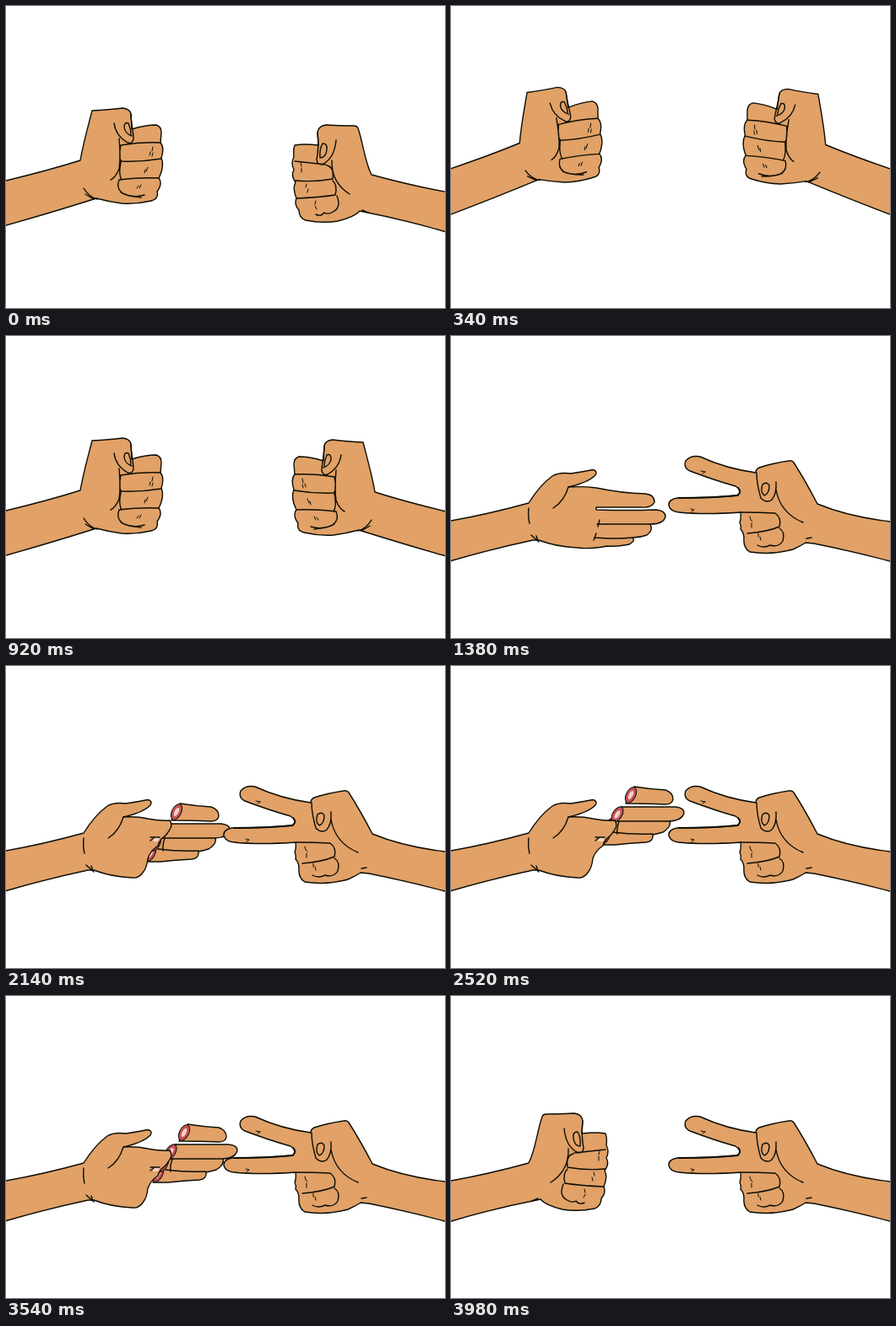
Recreate the animation shown at these times as an HTML page. Size 520 by 358 pixels, loop 4020 ms.

```html
<!DOCTYPE html>
<html lang="en">
<head>
<meta charset="utf-8">
<title>Rock paper scissors</title>
<style>
  html, body { margin: 0; width: 100%; height: 100%; overflow: hidden; background: #fff; }
  svg { display: block; width: 520px; height: 358px; }
  path, ellipse { stroke: #0c0d04; stroke-width: 1.4; stroke-linecap: round; stroke-linejoin: round; fill: none; }
  .skin { fill: #e1a167; }
  .fine { stroke-width: 1; }
  .bold { stroke-width: 2; }
  .flesh { fill: #c9505a; stroke-width: 1; }
  .bone { fill: #f3d3c4; stroke: none; }
</style>
</head>
<body>
<svg viewBox="0 0 520 358">
  <defs>
    <g id="up">
      <path class="skin" d="M-40 207L0 188.5L80 150.5Q76 120 78 93Q78 90 82 88Q98 80 117 76Q120 75 121 78Q126 86 131 98Q143 89 152 84Q155 82 159 85Q166 92 168 102Q173 108 171 117Q178 124 173 136Q177 147 169 154Q174 165 173 176Q171 184 160 186Q135 189 108 185.5L0 237L-40 256"/>
      <path d="M111 103Q114 115 126 116Q138 114 137 109Q135 104 131 98M117 95Q118 91 124 94Q128 98 128 104M117 95Q119 103 126 105M124 117Q128 145 120 159M126 118Q145 115 167 106M126 118Q123 128 129 133Q150 128 173 128M129 133Q124 145 129 150Q150 148 169 152M127 151Q126 165 133 167Q142 168 147 170M138 170Q150 168 157 169M146 170Q147 176 151 178M105 184L113 187"/>
      <path class="fine" d="M156 90l-1 3l3 3l-1 4l2 3M157 111l-1 4l2 3M154 134l-1 3l2 3M152 154l1 3l0 4"/>
    </g>

    <g id="down">
      <path class="skin" d="M-40 217L0 207Q50 195 88 183C92 160 98 140 102 124Q122 123 138 121Q147 122 148 128L149 146Q165 141 178 141Q184 143 184 150L183 162Q188 168 184 180Q188 190 181 204Q186 210 179 220Q181 229 172 231Q155 235 137 234Q122 232 107 228Q50 246 0 260L-40 271"/>
      <path d="M148 128C148 138 151 150 151 158Q149 164 144 162Q130 154 128 139M140 144Q140 137 145 139Q148 146 148 152M140 144Q141 151 149 154M134 157Q136 180 134 193Q130 203 124 206M136 165Q160 161 183 162M136 165Q133 182 137 184Q160 185 184 181M136 185Q133 200 137 206M134 206Q160 203 181 204M134 206Q130 216 138 222Q150 228 164 224M136 221Q144 226 160 227M92 216Q98 226 108 229M94 223L104 229"/>
      <path class="fine" d="M174 167l-1 5M174 174l-1 4M171 173l-1 4M168 191l-2 5M165 194l-1 4M160 212l-2 4M157 213l-2 3"/>
    </g>

    <g id="mid"><use href="#down" transform="rotate(-5 -150 250)"/></g>

    <g id="low">
      <path class="skin" d="M-40 228L0 219Q45 211 92 198C100 183 102 160 108 143Q109 140 113 140Q130 140 146 139Q155 140 156 148L155 163Q172 161 183 163Q185 168 184 177Q188 184 184 192Q188 199 182 207Q186 214 181 226Q184 233 178 240Q178 249 170 252Q150 256 132 253Q112 248 106 241Q50 252 0 267L-40 277"/>
      <path d="M156 148Q154 165 157 180Q156 188 149 185Q136 178 134 157M145 168Q144 161 150 161Q154 168 153 178Q146 178 145 168M139 181Q140 207 118 221M146 186Q165 184 183 182M145 187Q136 189 138 203Q160 207 182 205M138 205Q132 211 135 222Q155 225 181 226M133 223Q128 236 136 241Q143 246 148 243Q152 248 158 245M96 243L103 240"/>
      <path class="fine" d="M176 184l-1 4M175 190l0 5M169 209l1 4M167 215l1 4M158 229l1 4M159 235l-2 4"/>
    </g>

    <g id="paper">
      <path class="skin" d="M-40 228L0 219Q45 211 92 198Q105 177 120 166Q128 161 142 163Q156 161 168 158.5Q174 160 171 165Q162 174 139 179Q155 178 172 180Q200 186 230 187Q241 188 241 197Q238 204 225 203L172 203L172 206Q210 207 243 206Q254 207 254 214Q252 223 236 223Q240 230 232 236Q224 239 215 239Q219 243 211 247Q195 250 185 249Q165 253 150 251Q125 250 104 242L97 242Q50 252 0 266.5L-40 277"/>
      <path d="M139 179Q134 196 121 204M92 204Q91 214 93 222M173 223H236M170 239Q195 241 215 239M176 218L174 226M172 234L169 242M95 236L104 244M101 237L103 243"/>
    </g>

    <g id="cut">
      <path class="skin" d="M-40 228L0 219Q45 211 92 198Q105 177 120 166Q128 161 142 163Q156 161 168 158.5Q174 160 171 165Q162 174 139 179Q155 178 168 181Q185 184 194 183Q197 187 195 192Q191 200 184 205Q181 209 180 213Q171 219 168 228Q167 239 162 245Q157 252 150 251Q125 250 104 242L97 242Q50 252 0 266.5L-40 277"/>
      <path class="bone" d="M172 203H182L180 208H175Z"/>
      <path d="M139 179Q134 196 121 204M92 204Q91 214 93 222M171 203H182M171 207L175 204M95 236L104 244M101 237L103 243"/>
    </g>

    <g id="scissors">
      <path class="skin" d="M560 229L520 220Q470 214 434 199Q420 172 406 150Q404 147 400 148Q380 151 365 156Q361 158 361 162Q325 157 295 143Q284 141 278 148Q275 156 283 160Q312 171 337 178Q345 183 340 189Q310 192 268 192Q257 194 258 201Q260 208 270 209Q300 212 343 209Q344 216 342 221Q344 225 343 229Q347 233 347 240Q346 251 354 256Q380 260 405 253Q414 249 420 245L430 246Q475 255 520 267L560 277"/>
      <path d="M362 162Q362 175 367 192Q374 199 380 194Q386 187 385 173M385 182Q390 210 417 221M369 176Q374 172 377 177Q377 187 371 189Q366 185 369 176M343 209Q365 209 384 210Q392 216 389 226Q375 232 351 234M389 228Q396 232 393 243Q388 251 378 248Q370 252 363 248M421 240L427 239"/>
      <path class="bold" d="M270 192Q310 192 339 189Q345 185 340 180"/>
      <path class="fine" d="M354 214l1 4l2 2M356 222l0 5M364 234l0 4M366 238l1 4M296 160l5 1M298 163l3 -2M284 205l4 1l-3 2"/>
    </g>

    <g id="wound">
      <ellipse class="flesh" rx="5.5" ry="10"/>
      <ellipse class="bone" rx="2.4" ry="5.5"/>
    </g>
  </defs>

  <g id="pieces">
    <path class="skin" d="M206 163Q225 166 243 167Q252 170 252 178Q251 184 243 184Q215 183 196 183Z"/>
    <use href="#wound" transform="translate(202 173) rotate(27)"/>
    <path class="skin" d="M190 187H255Q265 188 265 194Q263 203 248 204Q250 211 240 217Q233 219 228 220Q229 228 220 229Q200 230 183 232L165 232Z"/>
    <path d="M182 204H248M180 217Q205 220 228 219M188 204Q185 214 186 219"/>
    <use href="#wound" transform="translate(171 222) rotate(27)"/>
    <use href="#wound" transform="translate(177 210) rotate(27)"/>
    <use href="#wound" transform="translate(186 196) rotate(32)"/>
  </g>
  <use id="left"/>
  <use id="right"/>
</svg>
<script>
  const LOOP = 4020, STEP = 40;
  const $ = id => document.getElementById(id);
  const left = $('left'), right = $('right'), pieces = $('pieces');

  // start in ms, left pose, right pose (same as left when omitted)
  const poses = [[0, 'down', 'low'], [80, 'mid'], [160, 'up']];
  for (const t of [340, 800]) {
    poses.push([t, 'mid'], [t + 40, 'low'], [t + 120, 'down'], [t + 200, 'mid'], [t + 280, 'up']);
  }
  poses.push([1340, 'low'], [1380, 'paper', 'scissors'], [1820, 'cut', 'scissors'],
    [3800, 'paper', 'scissors'], [3980, 'low', 'scissors']);

  // bursts of movement of the loose fingers: start, steps, final x, final y
  const bursts = [
    [1820, 2, -8, 14], [2000, 1, -5, 9], [2140, 1, 0, 0], [2180, 5, 9, -17],
    [2480, 2, 11, -20], [2660, 1, 12, -21], [2800, 3, 13, -23], [3020, 4, 13, -21],
    [3280, 1, 13, -20], [3420, 4, 9, -11], [3680, 4, -10, 19]
  ];

  function offset(t) {
    let x = -10, y = 19;
    for (const [start, steps, toX, toY] of bursts) {
      if (t < start) break;
      const k = Math.min(1, (Math.floor((t - start) / STEP) + 1) / steps);
      x += (toX - x) * k;
      y += (toY - y) * k;
    }
    return [x, y];
  }

  function draw(now) {
    const t = now % LOOP;
    const [, l, r = l] = poses.findLast(p => p[0] <= t);
    left.setAttribute('href', '#' + l);
    right.setAttribute('href', '#' + r);
    right.setAttribute('transform', r === 'scissors' ? '' : 'translate(525 2) scale(-1 1)');
    pieces.style.display = l === 'cut' ? '' : 'none';
    pieces.setAttribute('transform', `translate(${offset(t)})`);
  }

  const begin = performance.now();
  function tick() {
    draw(performance.now() - begin);
    requestAnimationFrame(tick);
  }
  tick();
</script>
</body>
</html>
```
